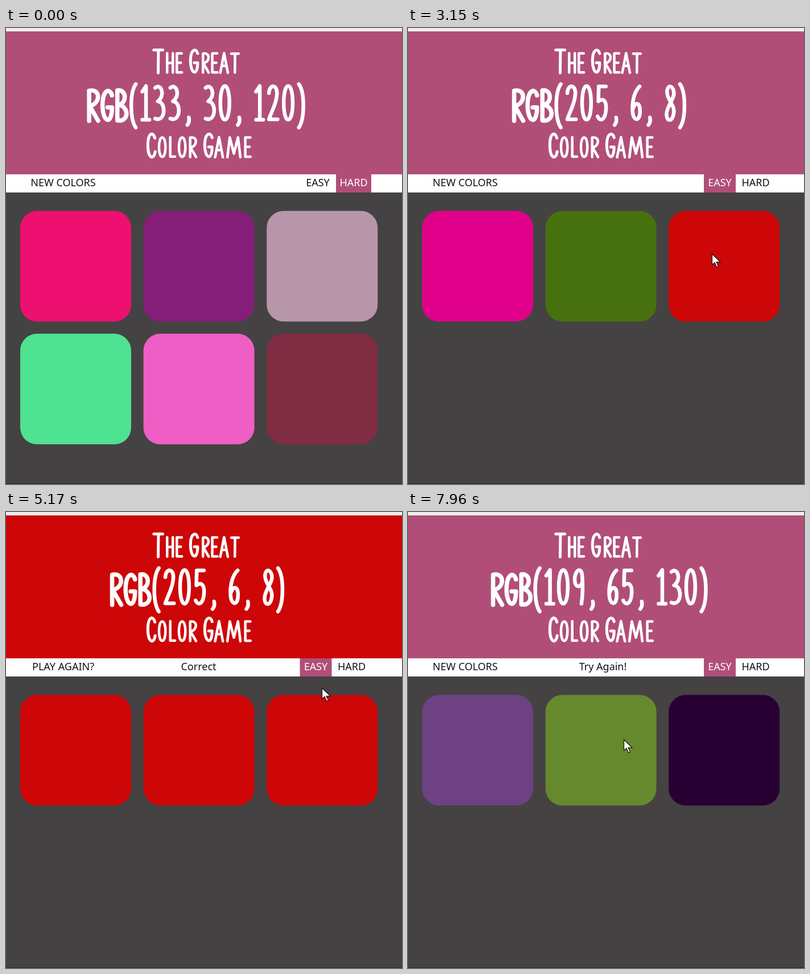
These frames come from a looping animation (696 by 804 pixels, 8000 ms). An HTML page with a canvas:

```html
<!DOCTYPE html>
<html lang="en">
<head>
<meta charset="utf-8">
<title>Color Game</title>
<style>
  html, body { margin: 0; width: 100%; height: 100%; overflow: hidden; background: #444242; }
  canvas { display: block; }
</style>
</head>
<body>
<canvas id="stage" width="696" height="804" role="img" aria-label="The Great RGB Color Game"></canvas>
<script>
const ctx = document.getElementById('stage').getContext('2d');
const LOOP = 8000;
const PINK = [177, 78, 120], RED = [205, 6, 8], GREY = [68, 66, 66];
const WHITE = [255, 255, 255], INK = [17, 17, 24];

// Hand-lettered strokes: [width, path], cap height 100.
const letters = {
  T: [42, 'M4 6H39M22 6L21 96'],
  H: [38, 'M6 4V96M33 4V96M6 52L33 49'],
  E: [32, 'M29 5H6V95H30M6 49H25'],
  G: [38, 'M33 20C28 -2 5 0 5 50S33 112 33 56H20'],
  R: [36, 'M6 96V6C40 -2 42 44 8 52L33 96'],
  A: [44, 'M4 97L22 4L40 97M11 64H33'],
  C: [36, 'M32 22C26 -4 5 0 5 50S28 108 33 74'],
  O: [40, 'M20 5C0 5 0 95 20 95S40 5 20 5Z'],
  L: [30, 'M6 4V94H28'],
  M: [70, 'M5 97L16 5L35 80L54 5L65 97'],
  B: [36, 'M6 5V95C42 100 42 52 8 48C36 46 34 0 6 5']
};
const figures = {
  0: [32, 'M16 5C0 5 0 95 16 95S32 5 16 5Z'],
  1: [26, 'M5 20L15 5V95M5 95H24'],
  2: [32, 'M5 24C6 -2 30 0 26 30C24 55 12 72 5 94H28'],
  3: [32, 'M5 10C20 -4 34 30 12 46C36 48 32 104 5 92'],
  5: [32, 'M27 6H8L7 46C22 34 30 48 27 72C24 98 10 100 5 86'],
  6: [28, 'M23 6C4 24 2 60 5 80C9 100 24 98 24 72S10 48 5 66'],
  8: [28, 'M23 16C16 -4 0 10 8 32S28 60 23 82S2 98 5 76S30 34 23 16'],
  9: [32, 'M27 34C24 54 6 54 6 30S24 -6 26 20S28 70 24 95'],
  '(': [20, 'M16 0C0 22 0 92 16 116'],
  ')': [20, 'M4 0C20 22 20 92 4 116'],
  ',': [19, 'M14 89C16 97 14 104 10 109'],
  ' ': [18, '']
};
const glyphs = {};
for (const [key, [width, path]] of Object.entries({ ...letters, ...figures }))
  glyphs[key] = { width, path: new Path2D(path) };

const cursorShape = new Path2D('M0.5 0.5V19.5L5 15.5L8.5 23.5L11.5 22L8 14.5H15Z');

// Cursor path: [time, x, y]
const cursorKeys = [
  [370, 546, 795], [700, 547, 560], [1000, 546, 310], [1140, 546, 279],
  [1300, 543, 271], [2150, 543, 271], [2230, 540, 272], [2460, 540, 272],
  [2700, 538, 310], [3000, 535, 388], [3150, 534, 398], [4720, 534, 398],
  [4950, 542, 365], [5200, 557, 303], [5400, 552, 277], [6030, 552, 277],
  [6330, 548, 278], [6640, 548, 278], [6800, 527, 344], [7100, 434, 388],
  [7330, 380, 401], [7500, 379, 401]
];

const hardSet = [[238, 16, 112], [133, 30, 120], [183, 150, 170], [78, 226, 146], [238, 94, 196], [128, 44, 66]];
const easySet = [[225, 0, 138], [71, 112, 15], RED];
const wonSet = [RED, RED, RED];
const nextSet = [[109, 65, 130], [148, 235, 17], [40, 0, 52]];
const missSet = [nextSet[0], GREY, nextSet[2]];

// A scene shows at `at`; its colours start to ease at `from`.
const scenes = [
  { at: 0, from: -900, set: hardSet, code: '(133, 30, 120)', left: 142.5 },
  { at: 1690, from: 1685, set: easySet, code: '(205, 6, 8)', left: 183 },
  { at: 3470, from: 3440, set: wonSet, code: '(205, 6, 8)', left: 183, message: 'Correct', won: true },
  { at: 6030, from: 5990, set: nextSet, code: '(109, 65, 130)', left: 146 },
  { at: 7810, from: 7760, set: missSet, code: '(109, 65, 130)', left: 146, message: 'Try Again!' }
];

const clamp = v => Math.min(1, Math.max(0, v));
const rgb = c => `rgb(${c.map(Math.round).join()})`;
const mix = (a, b, p) => a.map((v, i) => v + (b[i] - v) * p);

// CSS "ease": cubic-bezier(.25, .1, .25, 1)
function ease(x) {
  x = clamp(x);
  let lo = 0, hi = 1;
  for (let i = 0; i < 20; i++) {
    const u = (lo + hi) / 2, v = 1 - u;
    if (0.75 * v * v * u + 0.75 * v * u * u + u ** 3 < x) lo = u; else hi = u;
  }
  return 0.3 * (1 - lo) ** 2 * lo + 3 * (1 - lo) * lo * lo + lo ** 3;
}

function box(color, x, y, w, h, radius = 0) {
  ctx.fillStyle = rgb(color);
  ctx.beginPath();
  ctx.roundRect(x, y, w, h, radius);
  ctx.fill();
}

function letter(text, x, top, height, weight, gap) {
  const scale = height / 100;
  ctx.strokeStyle = '#fff';
  ctx.lineCap = ctx.lineJoin = 'round';
  for (const ch of text) {
    const glyph = glyphs[ch];
    ctx.save();
    ctx.translate(x, top);
    ctx.scale(scale, scale);
    ctx.lineWidth = weight / scale;
    ctx.stroke(glyph.path);
    ctx.restore();
    x += glyph.width * scale + gap;
  }
}

function label(text, x, color = INK) {
  ctx.font = '18px "Noto Sans", sans-serif';
  ctx.textAlign = 'center';
  ctx.fillStyle = rgb(color);
  ctx.fillText(text, x, 278.5);
}

function button(text, x, width, active) {
  box(mix(WHITE, PINK, active), x, 258, width, 32);
  label(text, x + width / 2, mix(INK, WHITE, active));
}

function drawTitle(scene) {
  letter('T', 258, 36, 45, 5, 0);
  letter('HE', 281, 43, 37, 4.5, 3);
  letter('G', 322, 36, 45, 5, 0);
  letter('REAT', 344, 43, 37, 4.5, 3);
  letter('RGB', scene.left, 107, 59, 7.5, 3);
  letter(scene.code, scene.left + 75, 99, 66, 6.5, 5.5);
  letter('C', 247, 184, 46, 5, 0);
  letter('OLOR', 267, 191, 38, 4.5, 4.2);
  letter('G', 347, 184, 46, 5, 0);
  letter('AME', 366, 191, 38, 4.5, 4.5);
}

function drawBar(t, scene) {
  const shift = scene.won ? -3.5 : 0;
  box(WHITE, 0, 258, 696, 32);
  label(scene.won ? 'PLAY AGAIN?' : 'NEW COLORS', 100.5);
  if (scene.message) label(scene.message, scene.won ? 338.5 : 342.5);
  button('EASY', 520 + shift, 56, ease((t - 1080) / 300));
  button('HARD', 580 + shift, 62, t < 1690 ? 1 : 1 - ease((t - 1685) / 300));
}

function drawSquares(t, index) {
  const { set, from } = scenes[index];
  const before = scenes[Math.max(0, index - 1)].set;
  const p = ease((t - from) / 600);
  set.forEach((color, i) =>
    box(mix(before[i], color, p), 25 + i % 3 * 216.6, 322.5 + Math.floor(i / 3) * 216.6, 195, 195, 29.5));
}

function drawCursor(t) {
  if (t < cursorKeys[0][0]) return;
  const next = cursorKeys.findIndex(k => k[0] > t);
  const b = next < 0 ? cursorKeys[cursorKeys.length - 1] : cursorKeys[next];
  const a = next < 0 ? b : cursorKeys[next - 1];
  const [, x, y] = mix(a, b, clamp((t - a[0]) / (b[0] - a[0] || 1)));
  ctx.save();
  ctx.translate(Math.round(x), Math.round(y));
  ctx.lineWidth = 1.2;
  ctx.lineJoin = 'miter';
  ctx.fillStyle = '#fff';
  ctx.strokeStyle = '#111';
  ctx.fill(cursorShape);
  ctx.stroke(cursorShape);
  ctx.restore();
}

function draw(t) {
  const index = scenes.findLastIndex(s => s.at <= t);
  const scene = scenes[index];
  box(GREY, 0, 0, 696, 804);
  box([40, 38, 38], 0, 803, 696, 1);
  box([240, 238, 239], 0, 0, 696, 6);
  box(scene.won ? RED : PINK, 0, 6, 696, 252);
  drawTitle(scene);
  drawBar(t, scene);
  drawSquares(t, index);
  drawCursor(t);
}

const start = performance.now();
function tick() {
  draw((performance.now() - start) % LOOP);
  requestAnimationFrame(tick);
}
tick();
</script>
</body>
</html>
```
